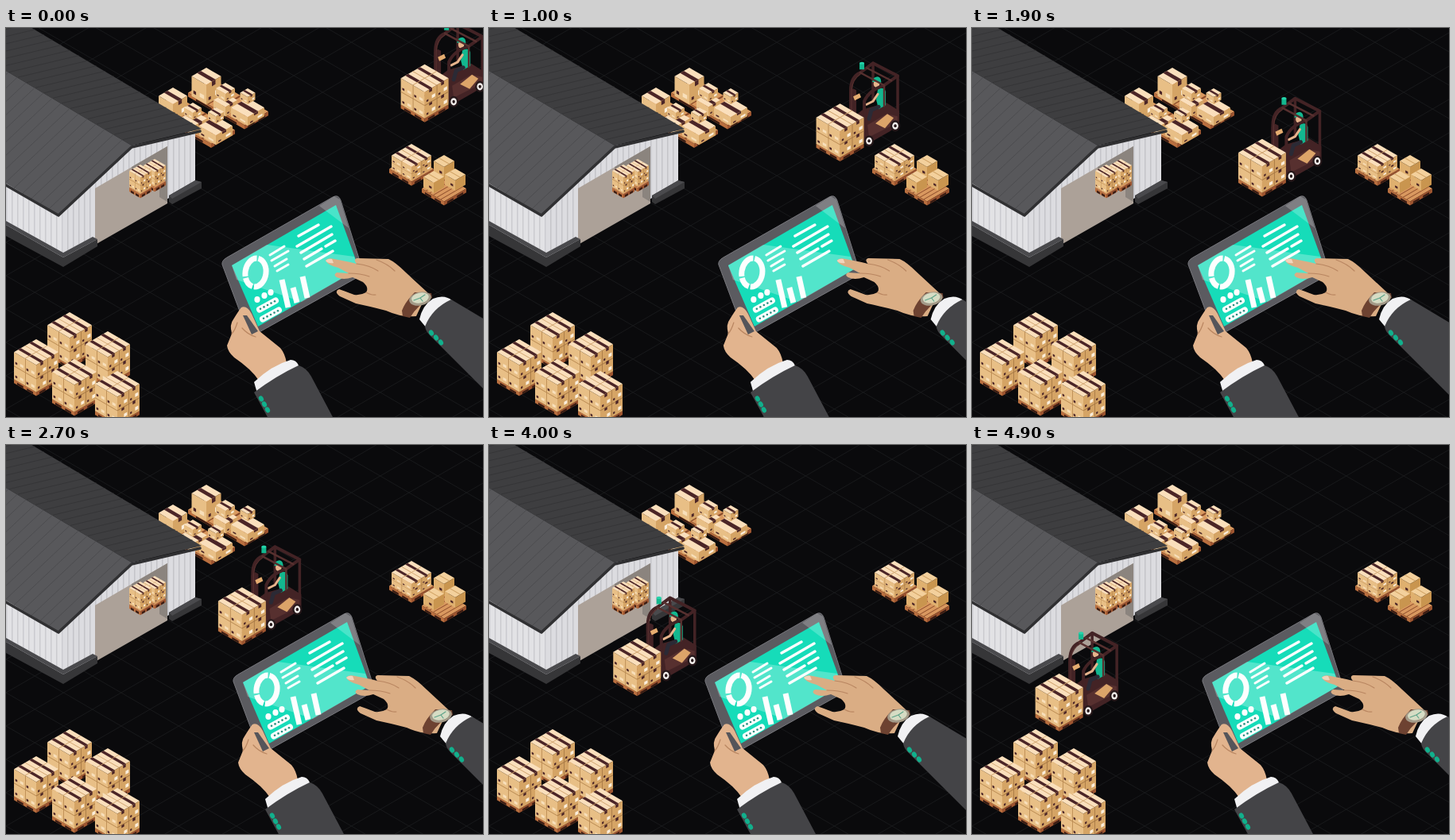
Recreate the animation shown at these times as an HTML page. Size 600 by 490 pixels, loop 5 s.

```html
<!DOCTYPE html>
<html lang="en">
<head>
<meta charset="utf-8">
<title>Warehouse</title>
<style>
html, body { margin: 0; width: 100%; height: 100%; overflow: hidden; background: #0a0a0c; }
svg { display: block; width: 600px; height: 490px; }
</style>
</head>
<body>
<svg id="stage" viewBox="0 0 600 490" xmlns="http://www.w3.org/2000/svg"></svg>
<script>
const SLOPE = 0.58;
const WOOD = ['#d9985f', '#b96f3f', '#9d5530'];
const CARD = ['#fadfbc', '#e8bf86', '#d5a465'];
const TAPE = '#4b2527';

const poly = (pts, fill, extra = '') => `<polygon points="${pts}" fill="${fill}" ${extra}/>`;
const path = (d, fill, extra = '') => `<path d="${d}" fill="${fill}" ${extra}/>`;
const line = (d, color, w, cap = 'round') =>
  path(d, 'none', `stroke="${color}" stroke-width="${w}" stroke-linecap="${cap}" stroke-linejoin="round"`);
const oval = (x, y, rx, ry, fill, extra = '') =>
  `<ellipse cx="${x}" cy="${y}" rx="${rx}" ry="${ry}" fill="${fill}" ${extra}/>`;
const rect = (x, y, w, h, fill) => `<rect x="${x}" y="${y}" width="${w}" height="${h}" fill="${fill}"/>`;
const range = (from, to, step, f) => {
  let out = '';
  for (let i = from; i < to; i += step) out += f(i);
  return out;
};

// A face is a unit square pushed into isometric space.
const face = (m, fill, inner) => `<g transform="matrix(${m})">${rect(0, 0, 1, 1, fill)}${inner}</g>`;

// Block with its back corner at x,y; u runs down-right, v down-left.
function block(x, y, u, v, h, [c0, c1, c2], top = '', left = '', right = '') {
  const a = u * SLOPE, b = v * SLOPE;
  return face([u, a, -v, b, x, y], c0, top) +
    face([u, a, 0, h, x - v, y + b], c1, left) +
    face([v, -b, 0, h, x + u - v, y + a + b], c2, right);
}

// Cartons packed n by n and n high.
function cargo(x, y, w, h, n = 2) {
  const s = 1 / n;
  let top = '', left = '', right = '';
  for (let i = 0; i < n; i++) {
    top += rect(0, (i + 0.38) * s, 1, 0.24 * s, TAPE);
    if (i) {
      top += rect(0, i * s - 0.015, 1, 0.03, '#cda06a') + rect(i * s - 0.015, 0, 0.03, 1, '#cda06a');
      left += rect(0, i * s, 1, 0.03, '#b98a52') + rect(i * s, 0, 0.03, 1, '#b98a52');
      right += rect(0, i * s, 1, 0.03, '#a67845') + rect(i * s, 0, 0.03, 1, '#a67845');
    }
    for (let j = 0; j < n; j++) {
      const px = i * s, py = j * s;
      left += rect(px + 0.12 * s, py + 0.66 * s, 0.18 * s, 0.16 * s, TAPE) +
        rect(px + 0.55 * s, py + 0.6 * s, 0.3 * s, 0.2 * s, '#f8dfba');
      right += rect(px + 0.38 * s, py, 0.24 * s, 0.24 * s, TAPE) +
        rect(px + 0.6 * s, py + 0.55 * s, 0.28 * s, 0.24 * s, '#fbeedb') +
        rect(px + 0.15 * s, py + 0.7 * s, 0.16 * s, 0.15 * s, TAPE);
    }
  }
  return block(x, y, w / 2, w / 2, h, CARD, top, left, right);
}

function pallet(x, y, u, v) {
  const gaps = rect(0.14, 0.45, 0.28, 0.55, '#3a1d14') + rect(0.58, 0.45, 0.28, 0.55, '#3a1d14');
  const slats = range(1, 6, 1, i => rect(i / 6, 0, 0.03, 1, '#8a4b2a'));
  return block(x, y, u, v, 5, WOOD, slats, gaps, gaps);
}

function load(x, y, w, h, pw = w) {
  return pallet(x, y + h + (w - pw) / 2 * SLOPE, pw / 2, pw / 2) + cargo(x, y, w, h);
}

// Plain carton with a small mark on its left side.
const carton = (x, y, h) => block(x, y, 13, 13, h, ['#f3d09c', '#dfb06f', '#c9954f'],
  rect(0, 0.46, 1, 0.08, '#cfa063'), rect(0.55, 0.5, 0.25, 0.2, TAPE));

function grid() {
  let d = '';
  for (let c = -360; c < 860; c += 42) d += `M0,${c}l600,${600 * SLOPE}M0,${c}l600,${-600 * SLOPE}`;
  return line(d, '#18191b', 1);
}

function yard() {
  return pallet(259, 64, 71, 30) + cargo(252, 50, 37, 25, 1) + cargo(276, 82, 30, 12, 1) +
    cargo(276, 69, 24, 10, 1) + cargo(304, 88, 42, 11, 1) + cargo(304, 76, 19, 9, 1) +
    pallet(213, 85, 75, 30) + cargo(210, 75, 36, 22, 1) + cargo(236, 104, 34, 12, 1) +
    cargo(235, 94, 22, 9, 1) + cargo(264, 111, 42, 12, 1) + cargo(264, 100, 20, 9, 1);
}

function warehouse() {
  const ridge = x => [x, 54 + 0.595 * x];
  const slope = (dx, dy, fill, seam) => {
    const [ax, ay] = ridge(-100), [bx, by] = ridge(158);
    return poly([ax, ay, bx, by, bx + dx, by + dy, ax + dx, ay + dy], fill) +
      line(range(-96, 156, 11, x => `M${ridge(x)}l${dx},${dy}`), seam, 1);
  };
  return poly('0,190 72,230 72,292 0,252', 'url(#wallL)') +
    poly('72,230 158,148 238,133 238,195 72,291', 'url(#wallR)') +
    poly('112,202 203,149 203,221 112,273', '#aca198') +
    poly('158,175 203,149 203,219 193,213 193,168 158,188', '#8b847e') +
    pallet(187, 185, 14, 14) + cargo(187, 165, 28, 18) +
    pallet(169, 193, 14, 14) + cargo(169, 172, 28, 20) +
    poly('0,248 72,289 115,266 115,275 72,301 0,262', '#363638') +
    poly('0,248 72,289 115,266 109,263 72,283 0,243', '#4a4a4d') +
    poly('205,211 238,192 246,194 246,202 209,222 205,219', '#363638') +
    poly('205,211 238,192 246,194 209,215', '#4a4a4d') +
    slope(88, -21, '#3e3e40', '#353537') +
    slope(-92, 87, '#58585b', '#4c4c4f') +
    line('M-26,183L66,236L158,150L244,130', '#303032', 3.5);
}

function forklift() {
  const dark = '#432325', mid = '#57302f', skin = '#e6b48c', teal = '#13b78f';
  const wheel = (x, y) => oval(x, y, 6, 7, '#26181a') + oval(x, y, 3.8, 4.6, '#f4efec') + oval(x, y, 1.7, 2.1, '#26181a');
  return line('M449,64V112M480,81V140', dark, 3.5) +
    poly('424,132 437,122 466,114 482,124 482,142 470,150 442,166 430,158', dark) +
    poly('442,142 466,128 480,131 480,139 444,157', mid) +
    poly('452,140 467,128 475,133 464,146', '#dca469') +
    path('M455,97Q463,93 465,100L465,117L456,122L453,110Z', teal) +
    line('M456,119L447,123L444,134', '#2b2a35', 5) +
    line('M455,103L449,112L441,116', skin, 3) +
    oval(453.5, 90, 3.8, 5, skin) +
    path('M448,88Q449,81 455,81Q460,82 459,90L455,87Z', teal) +
    poly('419,100 424,96 428,98 428,156 420,150', dark) +
    line('M421,150V98Q421,81 433,76L449,64L480,80L463,92Q444,98 438,112V152', dark, 4) +
    line('M433,76L463,92V118M441,70L472,86', mid, 2.5) +
    line('M422,146V99Q423,84 433,78', mid, 1.2) +
    poly('424,106 432,102 434,107 426,111', '#e5ad70') +
    wheel(444, 162) + wheel(477, 143) +
    rect(432, 64, 6, 8, teal) + oval(435, 64, 3, 1.6, '#25d3aa') +
    load(407.5, 115, 60, 33);
}

function tablet() {
  const ink = '#fdfefe';
  const dots = (x, y) => line(`M${x - 10},${y + 5.5}l20,-11`, ink, 8) +
    range(-2, 3, 1, i => oval(x + i * 4.5, y - i * 2.4, 1.3, 1.3, '#2b8f80'));
  return path('M278,289L411,213Q418,209 421,217L448,303Q450,310 444,313L315,385Q306,389 303,381L272,298Q271,293 278,289Z',
      '#5b5b60', 'stroke="#77777c" stroke-width="1"') +
    poly('284,299 415,223 444,303 317,376', '#16dcb9') +
    poly('284,299 328,273 438,288 444,303 372,345 290,317', '#fff', 'opacity=".26"') +
    poly('394,224 413,212 420,216 431,252', '#fff', 'opacity=".22"') +
    `<ellipse cx="314" cy="308" rx="13" ry="18" fill="none" stroke="${ink}" stroke-width="7"
      stroke-dasharray="24 2 14 2 30 2" transform="rotate(8 314 308)"/>` +
    line('M332,286L350,275M334,293L355,281M338,300L353,291M341,306L355,298', ink, 3) +
    line('M368,262L393,248M366,275L409,250M371,283L410,260M375,291L397,278M402,275L414,268M378,300L411,281', ink, 3.4) +
    oval(316, 342, 3.6, 4, ink) + oval(325, 337, 3.6, 4, ink) + oval(333, 333, 3.6, 4, ink) +
    dots(329, 349) + dots(333, 361) +
    line('M347,317L355,352M361,327L366,346M373,313L379,340', ink, 7, 'butt');
}

const CREASE = '#b98661', SUIT = '#444447';
const buttons = list => list.map(([x, y]) => oval(x, y, 2.8, 3.8, '#11b08c', `transform="rotate(-30 ${x} ${y})"`)).join('');

function leftHand() {
  return path('M286,367Q292,357 296,352Q303,349 309,360L319,382L345,403Q351,410 353,422L318,444Q309,430 287,415Q279,408 278,400L284,385Q281,373 286,367Z', '#e2b48e') +
    line('M284,385Q288,381 291,371M297,378Q304,386 314,389', CREASE, 1.2) +
    poly('298,362 303,362 317,382 309,386', '#55555a') +
    path('M312,446Q334,425 358,418Q365,418 368,425L366,434L316,460Z', '#f1f1f3') +
    path('M312,459Q340,438 368,425Q378,428 384,439L412,492H330Z', SUIT) +
    buttons([[321, 467], [325, 474], [329, 481]]);
}

function rightHand() {
  return path('M402,293Q405,289 413,291L433,295L441,297Q436,291 442,290L481,291Q490,295 503,308L530,333L516,363Q498,365 478,356Q455,350 440,347L420,338Q412,332 419,329Q425,331 438,336Q446,337 453,333Q457,327 449,320L436,314Q424,318 416,314Q411,311 416,308L431,309L418,302Q405,299 402,293Z', '#daad84') +
    line('M441,297Q458,299 468,306M431,309Q446,309 457,313M466,292Q480,297 489,306M453,333Q460,337 465,336', CREASE, 1.2) +
    path('M402,293Q405,290 410,291L412,296Q405,297 402,293Z', '#f2d4bc') +
    path('M498,356Q502,345 514,333L535,334L536,340Q519,347 508,365L499,363Z', '#6d4231') +
    oval(521, 341, 14, 8.5, '#a39a88', 'transform="rotate(-12 521 341)"') +
    oval(521, 340, 11, 6.5, '#d6dcc4', 'transform="rotate(-12 521 340)"') +
    line('M513,343L521,340L527,336M521,340L524,344', '#5fa48a', 1.2) +
    path('M520,367Q524,349 537,341Q551,335 561,343L540,382L529,378Z', '#f1f1f3') +
    path('M527,376Q536,353 560,342L660,402V514L533,387Q528,382 527,376Z', SUIT) +
    buttons([[535, 384], [541, 390], [547, 396]]);
}

const wall = (id, base, seam) =>
  `<pattern id="${id}" width="7" height="7" patternUnits="userSpaceOnUse">${rect(0, 0, 7, 7, base)}${rect(0, 0, 1.5, 7, seam)}</pattern>`;

document.getElementById('stage').innerHTML =
  `<defs>${wall('wallL', '#e2e2e5', '#cbcbcf')}${wall('wallR', '#dcdce0', '#c4c4c9')}</defs>` +
  grid() + yard() + warehouse() +
  load(510, 146, 50, 17, 56) +
  pallet(551, 186, 28, 28) +
  carton(551, 160, 15) + carton(565, 177, 13) + carton(538, 180, 13) +
  `<g id="truck">${forklift()}</g>` +
  [[80, 358], [128, 382], [38, 392], [86, 417], [140, 432]].map(([x, y]) => load(x, y, 56, 34)).join('') +
  `<g id="pad">${tablet()}${leftHand()}</g><g id="hand">${rightHand()}</g>`;

// Sideways sway: smooth curve through a few points, flat at the turns.
const TIMES = [0, 500, 950, 1400, 1900, 2700, 3000, 3500, 4000, 4900];
const PAD = [0, 10, 17, 10, 0, 14, 17, 10, 0, 18];
const HAND = [0, 20, 36, 18, -8, 26, 36, 16, -6, 38];

function sway(v, t) {
  const tangent = i => {
    if (i < 1 || i > v.length - 2 || (v[i] - v[i - 1]) * (v[i + 1] - v[i]) <= 0) return 0;
    return (v[i + 1] - v[i - 1]) / (TIMES[i + 1] - TIMES[i - 1]);
  };
  let i = 0;
  while (i < v.length - 2 && t > TIMES[i + 1]) i++;
  const d = TIMES[i + 1] - TIMES[i], s = Math.min(1, (t - TIMES[i]) / d), r = 1 - s;
  return v[i] * r * r * (1 + 2 * s) + v[i + 1] * s * s * (3 - 2 * s) +
    d * s * r * (tangent(i) * r - tangent(i + 1) * s);
}

const move = (id, x, y = 0) => document.getElementById(id).setAttribute('transform', `translate(${x} ${y})`);

function frame() {
  const t = Math.floor(performance.now() % 5000 / 100) * 100;
  move('truck', (1400 - t) * 0.0851, (t - 1400) * 0.0494);
  move('pad', sway(PAD, t));
  move('hand', sway(HAND, t));
  requestAnimationFrame(frame);
}
frame();
</script>
</body>
</html>
```
